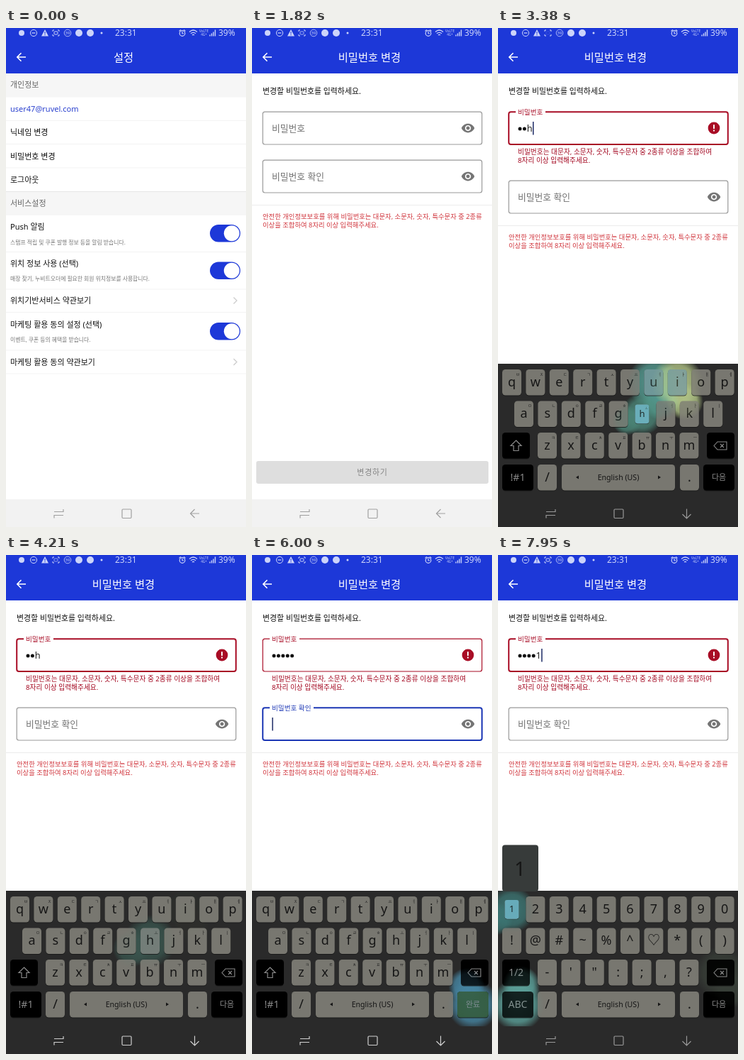
Recreate the animation shown at these times as an HTML page. Size 339 px wide and 703 px high, loop 8 s.

```html
<!DOCTYPE html>
<html lang="ko">
<head>
<meta charset="utf-8">
<title>비밀번호 변경</title>
<style>
html, body { margin: 0; width: 100%; height: 100%; overflow: hidden; background: #fff; }
svg { display: block; width: 100%; height: 100%; }
text { font-family: "Noto Sans", "Noto Sans CJK KR", "Noto Sans CJK", sans-serif; white-space: pre; }
</style>
</head>
<body>
<svg id="stage" viewBox="0 0 339 703"></svg>
<script>
const LOOP = 8000;
const BLUE = '#1d38d8', FOCUS = '#1c37b5', RED = '#a80c25', GRAY = '#757575', STATUS = '#ccd4fa';
const KEY = '#787770', KEYBED = '#2a2a2a';
const PASS = '비밀번호', CHECK = '비밀번호 확인';

// key, time, glow colour, lobe angle
const taps = [
  ['u', 2850, '#5aa79c', 1.2], ['i', 3020, '#c2d792', 1.2], ['h', 3290, '#4f9080', 2.75],
  ['w', 4250, '#a3b184', 2.2], ['q', 4490, '#5b6a58', .8], ['next', 5720, '#4b93b4', -1.9],
  ['del', 6960, '#566b55', 1], ['sym', 7420, '#62b0a8', -1.4], ['1', 7800, '#3f7f7c', 2.6]
];
// time, hidden count, visible character
const typed = [
  [0, 0, ''], [2850, 0, 'u'], [3020, 1, 'i'], [3290, 2, 'h'], [4250, 3, 'w'],
  [4490, 4, 'q'], [5990, 5, ''], [6960, 4, ''], [7800, 4, '1']
];
const FOCUS1 = 1900, FOCUS2 = 5720, REFOCUS = 6400, ERROR = 2850, SYMBOLS = 7500;

const clamp = v => Math.max(0, Math.min(1, v));
const ramp = (t, a, b) => clamp((t - a) / (b - a));
const ease = v => 1 - (1 - v) ** 3;

const text = (x, y, size, str, fill = '#111', more = '') =>
  `<text x="${x}" y="${y + size * .36}" font-size="${size}" fill="${fill}" ${more}>${str}</text>`;
const mid = (x, y, size, str, fill, more = '') => text(x, y, size, str, fill, 'text-anchor="middle" ' + more);
const rect = (x, y, w, h, fill, r = 0, more = '') =>
  `<rect x="${x}" y="${y}" width="${w}" height="${h}" rx="${r}" fill="${fill}" ${more}/>`;
const line = (d, color, w = 1, more = '') =>
  `<path d="${d}" fill="none" stroke="${color}" stroke-width="${w}" ${more}/>`;
const dot = (x, y, r, fill, more = '') => `<circle cx="${x}" cy="${y}" r="${r}" fill="${fill}" ${more}/>`;
const group = (id, body) => `<g id="${id}">${body}</g>`;

function statusBar() {
  return dot(22, 7, 4, STATUS) +
    dot(39, 7, 4.6, 'none', `stroke="${STATUS}"`) + line('M36.5 7h5', STATUS, 1.2) +
    `<path d="M55 2l5 9.5H50z" fill="${STATUS}"/>` + line('M55 5.3v3M55 9v1.2', BLUE, 1.1) +
    line('M66 5V3h2M73 3h2v2M75 9v2h-2M68 11h-2V9', STATUS) +
    rect(68, 5, 5, 4, 'none', 1, `id="rec" stroke="${STATUS}"`) +
    dot(87, 7, 4.8, 'none', `stroke="${STATUS}" stroke-width=".8"`) + mid(87, 7, 6, '39', STATUS) +
    dot(103, 7, 5, STATUS) + dot(119, 7, 5, STATUS) + dot(135, 7, 1.5, STATUS) +
    text(154, 7, 12, '23:31', STATUS) +
    dot(249, 7.5, 3.8, 'none', `stroke="${STATUS}" stroke-width="1.2"`) +
    line('M249 5v2.8h2M244.5 4.5l2.4-2M253.5 4.5l-2.4-2', STATUS, 1.1) +
    line('M259 5.5q5.5-5 11 0M261 7.8q3.5-3 7 0M263 10q1.5-1.4 3 0', STATUS, 1.2) +
    mid(279.5, 4.5, 4.6, 'VoLTE', STATUS) + mid(279.5, 9.5, 4.6, '4G+', STATUS) +
    line('M288 11.5v-2M290.5 11.5v-4M293 11.5v-6M295.5 11.5v-9', STATUS, 1.4) +
    text(300, 7, 12, '39%', STATUS);
}

function settings() {
  const row = (y, str, fill) => text(6, y, 11, str, fill);
  const note = (y, str) => text(6, y, 7.85, str, '#777');
  const section = (y, str) => rect(0, y, 339, 33.5, '#f6f6f6') + row(y + 16.5, str, '#666');
  const toggle = y => rect(288, y - 12, 43, 24.5, BLUE, 12.2) + dot(318.8, y + .3, 11, '#fff');
  const chevron = y => line(`M321.5 ${y - 4.5}l4.5 4.5-4.5 4.5`, '#ccc', 1.3);
  return rect(0, 64, 339, 600, '#fff') + mid(166, 41, 15.3, '설정', '#fff', 'font-weight="500"') +
    [130.5, 163.5, 197, 315.5, 368, 400.5, 454, 487].map(y => line(`M0 ${y}H339`, '#f3f3f3')).join('') +
    section(64, '개인정보') + section(230.5, '서비스설정') +
    line('M0 230.5H339', '#e6e6e6') +
    rect(0, 164, 339, 33, '#000', 0, 'id="press"') +
    row(114, 'user47@ruvel.com', '#2c42cf') + row(147, '닉네임 변경') + row(181, '비밀번호 변경') + row(214, '로그아웃') +
    row(280.5, 'Push 알림') + note(302, '스탬프 적립 및 쿠폰 발행 정보 등을 알림 받습니다.') +
    row(332, '위치 정보 사용 (선택)') + note(353.5, '매장 찾기, 누비트오더에 필요한 회원 위치정보를 사용합니다.') +
    row(384, '위치기반서비스 약관보기') + row(418, '마케팅 활용 동의 설정 (선택)') +
    note(439.5, '이벤트, 쿠폰 등의 혜택을 받습니다.') + row(471, '마케팅 활용 동의 약관보기') +
    [289, 341.5, 427].map(toggle).join('') + chevron(384) + chevron(470.5);
}

const eye = id => `<path id="${id}" transform="translate(295 131) scale(.84)" fill="${GRAY}" d="M12 4.5C7 4.5 2.73 7.61 1 12c1.73 4.39 6 7.5 11 7.5s9.27-3.11 11-7.5c-1.73-4.39-6-7.5-11-7.5zM12 17c-2.76 0-5-2.24-5-5s2.24-5 5-5 5 2.24 5 5-2.24 5-5 5zm0-8c-1.66 0-3 1.34-3 3s1.34 3 3 3 3-1.34 3-3-1.34-3-3-3z"/>`;

function field(n, label, notch) {
  return rect(15.2, 118.2, 309.6, 45.8, '#fff', 3, `id="box${n}"`) +
    rect(25, 115, notch, 6, '#fff', 0, `id="notch${n}"`) +
    `<text id="label${n}" font-size="12.8">${label}</text>` + eye('eye' + n) +
    rect(0, 132, 1.5, 18.5, '#1d2b66', 0, `id="caret${n}"`);
}

function password() {
  const warn = '#d0343c', err = '#a3061f';
  return rect(0, 64, 339, 600, '#fff') + mid(166, 41, 15.3, '비밀번호 변경', '#fff', 'font-weight="500"') +
    text(15, 89, 10.9, '변경할 비밀번호를 입력하세요.') +
    field(1, PASS, 42) +
    group('error', dot(305, 141, 8.4, RED) + line('M305 136.3v5.6M305 143.6v2', '#fff', 1.9) +
      text(28, 175, 9.7, '비밀번호는 대문자, 소문자, 숫자, 특수문자 중 2종류 이상을 조합하여', err) +
      text(28, 186.5, 9.7, '8자리 이상 입력해주세요.', err)) +
    group('dots', [0, 1, 2, 3, 4].map(i => dot(31 + i * 6.4, 142, 2.5, '#111')).join('')) +
    text(0, 141, 12.8, '', '#222', 'id="last"') +
    group('below', `<g transform="translate(0 68)">${field(2, CHECK, 62)}</g>` +
      line('M0 249.5H339', '#ececec') +
      text(15, 265.5, 9.36, '안전한 개인정보보호를 위해 비밀번호는 대문자, 소문자, 숫자, 특수문자 중 2종류', warn) +
      text(15, 277.5, 9.36, '이상을 조합하여 8자리 이상 입력해주세요.', warn)) +
    rect(6, 610, 328, 32, '#dedede', 3) + mid(170, 626, 11, '변경하기', '#858585', 'letter-spacing=".7"');
}

const spots = {};
function key(id, x, y, w, face, dark, hint = '') {
  spots[id] = [x + w / 2, y + 18.5];
  return `<g id="key-${id}">` + rect(x, y + 1, w, 36.5, '#1a1a1a', 4.5) +
    rect(x, y, w, 36.5, dark ? '#000' : KEY, 4.5) +
    rect(x, y, w, 36.5, dark ? '#3f6b3e' : '#6fbfd6', 4.5, 'class="tint" opacity="0"') + face +
    (hint && mid(x + w - 5, y + 6.5, 6, hint, '#222')) + '</g>';
}
function keyRow(chars, x, y, hints = '') {
  return [...chars].map((c, i) => {
    const kx = x + i * 33.4;
    return key(c, kx, y, 27, mid(kx + 13.5, y + 17.5, 18, c === '<' ? '&lt;' : c, '#161616'), false, hints[i]);
  }).join('');
}
function layout(id, rows, left, toggle) {
  const soft = '#8a8a8a';
  const del = line('M305 588.5l5-5.5h13v11h-13zM314 586l5 5M319 586l-5 5', soft, 1.1);
  return group(id, rows +
    key(id + 'left', 6, 570, 39, left, true) + key(id === 'abc' ? 'del' : 'del2', 295, 570, 39, del, true) +
    key(id === 'abc' ? 'sym' : 'abcKey', 6, 615, 44, mid(28, 633, 14, toggle, soft), true) +
    keyRow('/', 56, 615) + keyRow('.', 257, 615) +
    key(id + 'space', 90, 615, 160, mid(170, 633, 10.6, 'English (US)', '#161616') +
      '<path d="M114 630.5v5l-4-2.500zM226 630.5v5l4-2.500z" fill="#161616"/>', false) +
    key(id === 'abc' ? 'next' : 'next2', 290, 615, 44,
      mid(312, 633, 11, '다음', soft, id === 'abc' ? 'id="nextText"' : ''), true));
}

function keyboard() {
  const abc = layout('abc',
    keyRow('qwertyuiop', 6, 481, 'ㅂㅈㄷㄱㅅㅛㅕㅑㅐㅔ') + keyRow('asdfghjkl', 23, 525.5, 'ㅁㄴㅇㄹㅎㅗㅓㅏㅣ') +
    keyRow('zxcvbnm', 56, 570, 'ㅋㅌㅊㅍㅠㅜㅡ'),
    line('M25.500 581l7.500 7.500h-4v7h-7v-7h-4z', '#8a8a8a', 1.2), '!#1');
  const sym = layout('symbols',
    keyRow('1234567890', 6, 481) + keyRow('!@#~%^♡*()', 6, 525.5) + keyRow('-\'":;,?', 56, 570),
    mid(25.5, 588, 14, '1/2', '#8a8a8a'), 'ABC');
  const glow = over => taps.map(([k, , , a], i) => {
    const [x, y] = spots[k];
    return `<g class="glow${over}" opacity="0"><g transform="translate(${x} ${y})"><g class="grow">` +
      dot(0, 0, 34, `url(#g${i})`) + dot(26 * Math.cos(a), 26 * Math.sin(a), 24, `url(#g${i})`) + '</g></g></g>';
  }).join('');
  return rect(0, 473, 339, 192, KEYBED) + glow(0) + abc + sym + glow(1);
}

const gradients = taps.map(([, , c], i) =>
  `<radialGradient id="g${i}">` + [[0, .95], [.65, .75], [1, 0]].map(([o, a]) =>
    `<stop offset="${o}" stop-color="${c}" stop-opacity="${a}"/>`).join('') + '</radialGradient>').join('');

const stage = document.getElementById('stage');
stage.innerHTML =
  `<defs>${gradients}<clipPath id="panel">${rect(0, 473, 339, 191, '#000')}</clipPath></defs>` +
  rect(0, 0, 339, 703, '#fff') + rect(0, 0, 339, 64, BLUE) +
  group('settings', settings()) + group('password', password()) +
  statusBar() + line('M28 41H16M21.500 35.300L15.800 41l5.700 5.700', '#fff', 1.6) +
  `<g clip-path="url(#panel)">${group('keyboard', keyboard())}</g>` +
  group('popup', rect(6, 408.5, 51, 65.5, '#373b3a', 4) + mid(31, 442, 27, '1', '#151515')) +
  rect(0, 664, 339, 39, '#f2f2f2', 0, 'id="navBg"') +
  `<g id="nav" fill="none" stroke-width="1.2"><path d="M68 681.500h13v-3.500M81 686.500H68v4"/>
   <rect x="164" y="678" width="13" height="12.500" rx="1.200"/><path id="back"/></g>`;

const $ = id => document.getElementById(id);
const set = (el, attrs) => { for (const k in attrs) el.setAttribute(k, attrs[k]); };
const show = (id, on) => set($(id), { visibility: on ? 'inherit' : 'hidden' });
const glows = [0, 1].map(n => [...document.querySelectorAll('.glow' + n)]);

function drawField(n, lift, focused, bad) {
  const color = bad ? RED : focused ? FOCUS : '#999';
  set($('box' + n), { stroke: color, 'stroke-width': focused ? 2 : 1.2 });
  show('notch' + n, lift > .5);
  set($('label' + n), {
    transform: `translate(28 ${145.6 - 24 * lift}) scale(${1 - .25 * lift})`,
    fill: bad ? RED : focused ? FOCUS : '#737373'
  });
}

function drawTap([id, at], i, t) {
  const age = t - at, live = age >= 0 && age < 1300;
  const alpha = live ? ramp(age, 0, 80) * (1 - ramp(age, 550, 1200)) : 0;
  const size = .7 + .4 * ease(ramp(age, 0, 500));
  glows.forEach((list, n) => {
    set(list[i], { opacity: alpha * (n ? .2 : .85) });
    set(list[i].querySelector('.grow'), { transform: `scale(${size})` });
  });
  const el = $('key-' + id), [x, y] = spots[id];
  const letter = id.length === 1;
  const pressed = letter && age >= 0 && age < 220;
  const s = pressed ? .73 : 1;
  set(el, { transform: `translate(${x * (1 - s)} ${y * (1 - s)}) scale(${s})` });
  const tint = !live ? 0 : letter ? (pressed ? .85 : .42 * (1 - ramp(age, 500, 1000)))
    : id === 'next' ? .8 * (1 - ramp(age, 350, 800)) : 0;
  set(el.querySelector('.tint'), { opacity: tint });
}

function render(t) {
  set($('rec'), { opacity: .5 + .5 * Math.cos(t * Math.PI / 500) });
  set($('press'), { opacity: .1 * ramp(t, 800, 900) });

  const fade = ramp(t, 1000, 1300);
  set($('settings'), { opacity: 1 - ramp(fade, .98, 1) });
  set($('password'), { opacity: fade });
  // the header titles cross-fade on the shared blue bar
  set($('settings').querySelector('text'), { opacity: 1 - fade });

  const second = t >= FOCUS2 && t < REFOCUS, first = t >= FOCUS1 && !second, bad = t >= ERROR;
  drawField(1, ease(ramp(t, FOCUS1, FOCUS1 + 150)), first, bad);
  drawField(2, ease(ramp(t, FOCUS2, FOCUS2 + 150)) * (1 - ease(ramp(t, REFOCUS, REFOCUS + 150))), second, false);
  show('error', bad);
  show('eye1', !bad);
  set($('below'), { transform: `translate(0 ${bad ? 29 : 0})` });

  const [at, hidden, last] = typed.filter(s => s[0] <= t).pop();
  [...$('dots').children].forEach((d, i) => set(d, { opacity: i < hidden ? 1 : 0 }));
  $('last').textContent = last;
  set($('last'), { x: 28 + hidden * 6.4 });
  const width = { '': 0, i: 3.3, w: 10, 1: 7.3 }[last] ?? 7.9;
  const since = Math.max(at, ...[FOCUS1, FOCUS2, REFOCUS].filter(f => f <= t), 0);
  const blink = Math.floor((t - since) / 500) % 2 === 0;
  set($('caret1'), { x: 28.3 + hidden * 6.4 + width });
  set($('caret2'), { x: 28.3 });
  show('caret1', first && blink);
  show('caret2', second && blink);

  const up = t >= 2050;
  set($('keyboard'), { transform: `translate(0 ${192 * (1 - ease(ramp(t, 2050, 2320)))})` });
  show('keyboard', up);
  show('abc', t < SYMBOLS);
  show('symbols', t >= SYMBOLS);
  $('nextText').textContent = second ? '완료' : '다음';
  taps.forEach((tap, i) => drawTap(tap, i, t));
  show('popup', t >= 7800);

  set($('navBg'), { fill: up ? KEYBED : '#f2f2f2' });
  set($('nav'), { stroke: !up ? '#a0a0a0' : t > 3650 && t < 6720 ? '#cfcfcf' : '#999' });
  set($('back'), { d: up ? 'M266.5 677.5v13M260.500 685l6 6 6-6' : 'M273 684H260.500M266.500 678l-6 6 6 6' });
}

function frame() {
  render(performance.now() % LOOP);
  requestAnimationFrame(frame);
}
frame();
</script>
</body>
</html>
```
